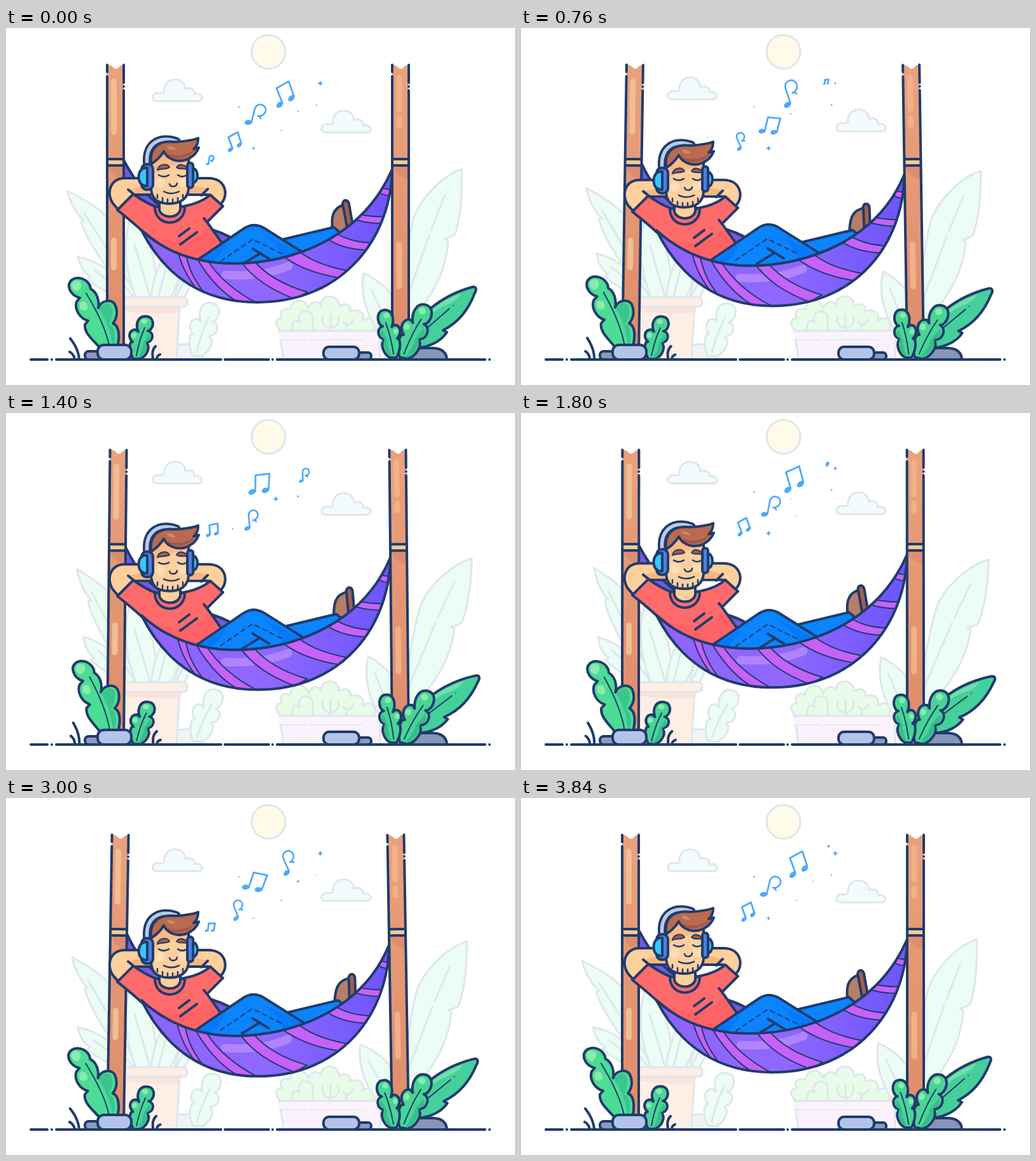
An HTML page that plays this animation: 800x561 px, repeating every 3.88 s.

```html
<!DOCTYPE html>
<html lang="en">
<head>
<meta charset="utf-8">
<title>Hammock</title>
<style>
html, body { margin: 0; width: 100%; height: 100%; overflow: hidden; background: #fff; }
svg { display: block; width: 800px; height: 561px; }
svg * { vector-effect: non-scaling-stroke; }
.ink { stroke: #203b6c; stroke-width: 4; stroke-linecap: round; stroke-linejoin: round; }
.pale { stroke: #dfe6ec; stroke-width: 3; stroke-linecap: round; stroke-linejoin: round; }
.thin { stroke-width: 2; }
.line { fill: none; }
.plain { stroke: none; }
.skin { fill: #ffcf9c; }
.blue { fill: #0a84ff; }
.music { stroke: #50a8fc; fill: #50a8fc; stroke-linecap: round; stroke-linejoin: round; }
.music * { vector-effect: none; }
</style>
</head>
<body>
<svg viewBox="0 0 800 561">
<defs>
  <clipPath id="clip"><path class="front"/></clipPath>
  <linearGradient id="wood" x2="0" y2="1"><stop stop-color="#e9a27e"/><stop offset="1" stop-color="#df8b6a"/></linearGradient>
  <linearGradient id="cloth"><stop stop-color="#8d63fb"/><stop offset=".5" stop-color="#9068ff"/><stop offset="1" stop-color="#6c55fb"/></linearGradient>
  <path id="cloud" d="M237 115C228 115 229 103 238 102C243 103 246 103 249 101C246 76 281 74 282 96C290 92 297 97 296 104C309 101 312 114 303 115Z"/>
  <path id="oak" d="M-3 0C-8-9-11-18-7-26L-4-27C-12-34-10-46 1-46L5-43C0-54 4-67 16-67C29-67 31-53 23-45L20-44C30-42 29-28 19-26L17-25C25-20 19-5 8 0Z"/>
  <path id="vein" class="line" d="M2-5C5-22 10-38 15-49"/>
  <g id="oakFront">
    <use href="#oak" fill="#47d596"/>
    <path class="plain" fill="#36bd8d" d="M5-2C10-12 13-18 12-24L21-39Q28-31 17-26Q22-14 8-2Z"/>
    <ellipse class="plain" cx="14" cy="-59" rx="5" ry="4" fill="#8aeaac"/>
    <ellipse class="plain" cx="-2" cy="-37" rx="4" ry="4" fill="#8aeaac"/>
    <use href="#vein" class="thin"/>
  </g>
  <g id="pole" class="ink">
    <path class="plain" fill="url(#wood)" d="M159 58C167 57 168 64 173 64C178 64 177 57 185 59V516H159Z"/>
    <path class="plain" fill="#cf7f63" opacity=".45" d="M161 217H184V238Q166 234 161 217Z"/>
    <path class="plain" fill="#f1cb94" d="M159 206H185V216H159Z"/>
    <path class="line" d="M159 58V69M159 76V516M185 58V86M185 92V92M185 98V516M159 206H185M159 216H185"/>
  </g>
  <g id="single" stroke-width="2.600">
    <ellipse class="plain" cx="-7" cy="15" rx="6" ry="4" transform="rotate(-20 -7 15)"/>
    <path class="line" d="M-2 14L-3-9C-3-23 16-22 15-9C14-3 9 0 5 0Q9 0 11 3"/>
  </g>
  <g id="double" stroke-width="2.800">
    <ellipse class="plain" cx="-12" cy="14" rx="6" ry="4" transform="rotate(-20 -12 14)"/>
    <ellipse class="plain" cx="9" cy="12" rx="6" ry="4" transform="rotate(-20 9 12)"/>
    <path class="line" d="M-7 13L-6-12L16-14L14 11"/>
  </g>
</defs>

<circle class="pale" cx="412.5" cy="37.5" r="26.5" fill="#fffbe8"/>
<g class="pale" fill="#f3fcfd">
  <use href="#cloud" id="cloudA"/>
  <use href="#cloud" id="cloudB"/>
</g>

<g class="pale" fill="#ebfdf4">
  <g data-sway="225 425 3.1 1940">
    <path d="M96 256C125 270 165 290 185 335L215 425L190 420C165 385 126 335 118 304L123 303C108 290 101 274 96 256Z"/>
    <path class="line" d="M122 290L200 410"/>
  </g>
  <g data-sway="215 455 2.9 1450">
    <path d="M113 360C145 365 175 385 205 430L190 430C165 418 140 407 128 394L133 391C122 386 117 374 113 360Z"/>
    <path class="line" d="M138 380L180 412"/>
  </g>
  <path d="M265 425C268 400 280 380 300 350C296 390 292 405 279 425Z"/>
  <path d="M205 425C182 370 185 320 200 290C228 330 240 380 236 425Z"/>
  <path d="M228 425C232 380 250 350 268 330C282 370 272 400 258 425Z"/>
  <path class="line" d="M202 340L226 421M255 362L240 421M290 378L268 421"/>
  <path fill="#f0f4f8" d="M262 520V505Q265 497 280 497H300Q310 499 310 520Z"/>
  <g data-sway="297 515 3.2 1940">
    <g transform="translate(297 515) rotate(3.5) scale(1.2 1.26)"><use href="#oak"/><use href="#vein"/></g>
  </g>
  <path fill="#fdeee6" d="M178 438H273L268 520H184Z"/>
  <path class="plain" fill="#fae4da" d="M180 439H272V448Q220 450 180 444Z"/>
  <rect fill="#fdeee6" x="167" y="423" width="118" height="15" rx="6"/>

  <path fill="#e8fce7" d="M432 476C420 466 424 455 434 456C426 445 438 438 446 443C450 424 470 424 475 440C482 426 492 430 495 436C494 418 522 416 524 437C535 430 543 437 541 445C556 440 565 450 560 460C574 450 584 462 578 476Z"/>
  <path class="line" d="M450 475C448 462 455 456 460 462M462 462A11 11 0 1 1 482 458M482 475V460M510 475V450M498 453A13 13 0 1 0 522 453M535 475V464M530 462Q538 472 546 458"/>
  <path fill="#fbf2fd" d="M430 478H588V520H436Z"/>
  <path class="line" d="M433 489H470M478 489H560"/>
  <rect fill="#fbf3fd" x="429" y="476" width="160" height="13" class="plain"/>
  <path class="line" d="M429 476H588"/>

  <g data-sway="610 500 2.05 1940">
    <path d="M716 222C685 232 650 270 640 300C632 330 625 400 615 480C660 440 692 390 695 334L690 331C700 328 708 325 708 317C717 285 717 250 716 222Z"/>
    <path class="line" d="M690 262L668 318M665 326L625 440"/>
  </g>
  <g data-sway="605 505 3.2 1100">
    <path d="M562 385C555 425 572 465 605 503L618 440C605 410 583 395 562 385Z"/>
    <path class="line" d="M574 411L602 470"/>
  </g>
</g>

<path class="ink" id="back" fill="#7459dd"/>
<g id="poleL"><use href="#pole"/>
  <path stroke="#f0bd94" stroke-width="9" stroke-linecap="round" d="M169.500 84V163M169.500 334V376"/></g>

<g id="foot" class="ink">
  <path fill="#b67e68" d="M514 326C510 296 513 284 530 278L540 318Z"/>
  <path fill="#a2604a" d="M529 276Q530 270 535 271Q538 272 539 276L546 315L537 318Z"/>
</g>
<path id="farLeg" class="ink blue" d="M415 337L515 313L526 322L450 375Z"/>
<g id="body">
<g class="ink skin">
  <path d="M225 236H186C163 236 156 262 170 278L178 287L203 262H232Z"/>
  <path d="M285 236H318C345 236 351 262 338 276L328 286L318 262H280Z"/>
  <path class="plain" fill="#f8b67f" d="M190 255L226 246V260H204ZM318 253L288 246V260H310Z"/>
  <path class="line" d="M192 254L203 263M317 253L307 263"/>
</g>
<g class="ink" fill="#ff6b6b">
  <path d="M200 261L175 286C185 294 200 306 213 318L300 385L343 343L316 305L341 280L321 262C310 272 295 277 280 280L236 281C222 276 210 268 200 261Z"/>
  <path class="plain" fill="#ff5a60" d="M222 325Q290 350 318 314L338 340L300 375Z" opacity=".5"/>
  <path class="line" d="M316 305L311 299M272 327L288 315M274 340L300 321"/>
  <path d="M234 281C234 314 281 314 281 281Z"/>
  <path class="skin" d="M241 265V286C245 300 271 300 274 285V265Z"/>
</g>
</g>
<g id="nearLeg" class="ink blue">
  <path d="M290 372L374 315Q389 305 405 314L475 358L430 390H300Z"/>
  <path class="plain" fill="#0072f5" d="M304 366L345 340Q335 366 300 380ZM400 322L466 355L440 372Q432 342 400 322Z" opacity=".6"/>
  <path class="line" d="M414 363L388 347M398 355L372 371"/>
  <path class="line thin" stroke-dasharray="7 6" d="M338 366L388 332L436 356"/>
</g>

<g id="head" class="ink">
  <path class="line" style="stroke-width:13" d="M222 216C218 184 238 168 268 178"/>
  <path class="line" style="stroke-width:5.500;stroke:#bccbe4" d="M222 216C218 184 238 168 268 178"/>
  <path class="skin" d="M228 205V250C228 270 240 276 257 276C274 276 287 268 287 250V203Z"/>
  <path class="plain" fill="#f9ba83" d="M230 208L248 198Q264 210 285 206V212Q255 214 232 230Z"/>
  <circle class="plain" cx="242" cy="244" r="8" fill="#ffddb5"/>
  <circle class="plain" cx="277" cy="243" r="7" fill="#ffddb5"/>
  <path fill="#b96a50" d="M228 214C225 190 238 176 265 179C282 178 293 177 302 173C302 183 299 187 295 190L303 188C298 200 292 202 286 206C272 212 255 208 248 194C242 204 235 209 228 214Z"/>
  <path class="plain" fill="#9f5748" d="M250 195C265 205 285 200 296 191C292 203 262 213 250 195Z"/>
  <path class="plain" fill="#cf8a6c" d="M252 186Q260 184 267 191Q257 193 252 186Z"/>
  <g class="thin">
    <path fill="#a75b48" d="M238 223C240 213 254 212 257 219C251 223 244 220 238 223ZM268 219C271 213 282 213 285 222C279 220 272 223 268 219Z"/>
    <path class="line" style="stroke-width:2.500" d="M240 231Q248 236 256 231M270 231Q277 236 284 231M257 245C259 251 268 250 269 244M248 257Q260 263 272 257M238 262V267M246 267V272M254 269V274M262 269V274M270 267V272M278 262V267"/>
  </g>
  <rect x="213" y="214" width="18" height="40" rx="8" fill="#4e7fdc"/>
  <path fill="#3ac6fa" d="M222 220C204 217 204 251 222 248Z"/>
  <path fill="#3ac6fa" d="M292 220C304 220 304 244 292 244Z"/>
  <rect x="285" y="212" width="9" height="39" rx="4" fill="#4e7fdc"/>
</g>

<path class="front plain" fill="url(#cloth)"/>
<g clip-path="url(#clip)">
  <g id="stripes" class="ink thin" fill="#c661fa">
    <path style="stroke:#b184ff;stroke-width:13" class="line" d="M345 388Q400 392 444 374"/>
    <path d="M270 350L283 357C288 380 296 396 310 414L298 408C284 390 275 372 270 350Z"/>
    <path d="M299 360L316 364C334 392 362 416 398 434L376 436C346 424 318 394 299 360Z"/>
    <path d="M366 363L388 364C408 388 436 404 474 415L454 426C416 411 388 394 366 363Z"/>
    <path d="M430 354L452 344C474 364 500 374 535 381L527 393C488 387 456 376 430 354Z"/>
    <path d="M500 328L513 319C532 332 552 337 580 338L572 349C546 349 520 343 500 328Z"/>
    <path d="M540 298L548 291Q574 298 600 296L596 307Q565 308 540 298Z"/>
    <path d="M582 256L588 250Q598 255 610 253V263Q594 265 582 256Z"/>
  </g>
</g>
<path class="front ink line"/>
<g id="poleR"><use href="#pole" x="448"/>
  <path stroke="#f0b08a" stroke-width="9" stroke-linecap="round" d="M618 78V128M618 142V153M618 340V406"/></g>

<g class="ink">
  <path class="line" data-sway="112 522 4.500 1450" d="M101 488C109 498 114 508 115 520M100 509Q106 512 108 520"/>
  <path class="line" data-sway="234 522 3 1940" d="M235 500C229 506 230 513 231 520M242 513Q237 515 237 520"/>
  <g data-sway="168 510 2 1400" fill="#4bdc95">
    <path d="M150 505C136 489 123 480 124 466L129 460C117 457 107 443 111 430L116 424C104 421 98 411 99 403C102 389 124 389 132 405L133 410C143 415 147 428 145 440C150 427 165 426 171 434C176 444 175 456 168 464C179 468 180 490 172 510Z"/>
    <path class="plain" fill="#3cc48f" d="M147 443Q153 429 164 434Q172 446 162 466L167 468Q175 482 168 504Q165 470 147 443Z"/>
    <path class="plain" fill="#8bebaa" d="M103 404Q106 393 117 399Q121 409 112 414Q104 412 103 404ZM116 432Q126 425 129 440Q125 448 116 441Z"/>
    <path class="line thin" d="M126 417C142 443 156 470 162 498"/>
  </g>
  <g data-sway="203 520 1.750 1940"><use href="#oakFront" transform="translate(203 520)"/></g>
  <rect x="124" y="508" width="30" height="13" rx="6" fill="#8c9bbb"/>
  <rect x="144" y="498" width="53" height="23" rx="10" fill="#b2c4e8"/>
  <rect x="545" y="510" width="29" height="11" rx="5" fill="#8c9bbb"/>
  <rect x="499" y="501" width="56" height="20" rx="9" fill="#b2c4e8"/>
  <path fill="#8796b8" d="M628 521Q635 503 655 503H672Q692 504 693 521Z"/>
  <g data-sway="640 503 2.050 1940">
    <path fill="#45d09b" d="M640 503C637 480 645 460 668 440C690 422 715 412 733 407C739 406 740 411 737 416C728 440 713 462 687 475L693 478C682 495 660 503 640 503Z"/>
    <path class="plain" fill="#70dfae" d="M666 445Q690 426 715 417Q708 430 688 437Q672 445 660 458Z"/>
    <path class="line thin" d="M703 436V436M697 441L652 480"/>
  </g>
  <g data-sway="622 518 1.800 1450"><use href="#oakFront" transform="translate(622 518) rotate(12) scale(1.150 1.330)"/></g>
  <g data-sway="610 518 2 1100"><use href="#oakFront" transform="translate(611 518) scale(-.950 1.120)"/></g>
  <path class="line" d="M39 521H65M72 521H72M79 521H338M344 521H413M419 521H419M426 521H753M760 521H760"/>
</g>
<g id="music" class="music"></g>
</svg>
<script>
const LOOP = 3880, BEAT = LOOP / 4, TAU = 2 * Math.PI;
const $ = id => document.getElementById(id);
const move = (el, value) => el.setAttribute('transform', value);

// age, x, y, scale, rotation along the rising path
const flight = [
  [0, 320, 208, .4, 8], [430, 324, 183, .6, -6], [800, 346, 178, .68, -24],
  [1000, 359, 178, .76, -22], [1430, 386, 168, .82, -2], [1765, 392, 150, .9, 12],
  [2000, 391, 132, .98, 18], [2400, 399, 108, 1, -3], [2735, 424, 103, 1.05, -18],
  [2950, 438, 103, .98, -25], [3370, 470, 98, .55, 2], [3700, 480, 83, .22, 2], [LOOP, 484, 74, 0, 0]
];
// x, y, size, time of the peak
const sparks = [
  [366, 124, .45, 930], [389, 189, 1, 780], [424, 135, 1, 490], [433, 161, .4, 90],
  [459, 131, .8, 240], [488, 121, .5, 790], [494, 87, 1.05, 30], [356, 182, .42, 500]
];

const music = $('music');
music.innerHTML = [0, 1, 2, 3].map(i => `<use href="#${i % 2 ? 'double' : 'single'}"/>`).join('') +
  sparks.map(() => '<path stroke-width="2.200" d="M-2.500 0H2.500M0-2.500V2.500"/>').join('');
const parts = [...music.children];
const notes = parts.slice(0, 4), stars = parts.slice(4);

const swaying = [...document.querySelectorAll('[data-sway]')].map(el => {
  const [x, y, size, peak] = el.dataset.sway.split(' ').map(Number);
  return { el, x, y, size, peak };
});

const wave = (t, peak, period = LOOP) => Math.cos(TAU * (t - peak) / period);

function flightAt(age) {
  const i = Math.max(1, flight.findIndex(k => k[0] >= age));
  const a = flight[i - 1], b = flight[i], f = (age - a[0]) / (b[0] - a[0]);
  return a.map((v, j) => v + (b[j] - v) * f);
}

function draw(t) {
  const s = (1 - wave(t, 0, LOOP / 2)) / 2;

  for (const { el, x, y, size, peak } of swaying)
    move(el, `rotate(${size * (wave(t, peak) - wave(0, peak))} ${x} ${y})`);
  move($('cloudA'), `translate(0 ${-2 - 2.5 * wave(t, 1500)})`);
  move($('cloudB'), `translate(265 ${49 - 2.5 * (1 - wave(t, 0))})`);

  move($('poleL'), `rotate(${.97 * s} 172 515)`);
  move($('poleR'), `rotate(${-.97 * s} 620 515)`);
  move($('head'), `translate(0 ${6.5 * s})`);
  move($('body'), `translate(0 ${3 * s})`);
  move($('foot'), `translate(${6 * s} ${6 * s}) rotate(${9 * s} 535 300)`);
  move($('farLeg'), `translate(${7 * s} ${5 * s})`);
  move($('nearLeg'), `translate(${-s} ${-s})`);
  move($('stripes'), `translate(${-s} ${5 * s})`);

  $('back').setAttribute('d', `M${184 + 5 * s} ${206 + 5 * s}C205 ${245 + 3 * s} 225 270 260 292L314 314Q338 320 358 332L360 380L213 318Q188 280 184 225Z`);
  const tip = `${607 - 5 * s} ${222 + 9 * s}`, low = 431 + 6.5 * s, edge = 370 + 4 * s;
  const cloth = `M213 318C250 352 300 ${edge} 360 ${edge}C450 ${edge} 560 ${330 + 4 * s} ${tip}` +
    `C${605 - 4 * s} ${330 + 6 * s} 530 ${low} 395 ${low}C310 ${low} 250 ${390 + 3 * s} 213 318Z`;
  for (const el of document.querySelectorAll('.front')) el.setAttribute('d', cloth);

  notes.forEach((el, i) => {
    const [, x, y, size, turn] = flightAt((t - i * BEAT + LOOP) % LOOP);
    move(el, `translate(${x} ${y}) rotate(${turn}) scale(${size})`);
  });
  stars.forEach((el, i) => {
    const [x, y, size, peak] = sparks[i];
    move(el, `translate(${x} ${y}) scale(${size * (1 + wave(t, peak, BEAT)) / 2})`);
  });
}

const start = performance.now();
function frame() {
  draw((performance.now() - start) % LOOP);
  requestAnimationFrame(frame);
}
frame();
</script>
</body>
</html>
```
